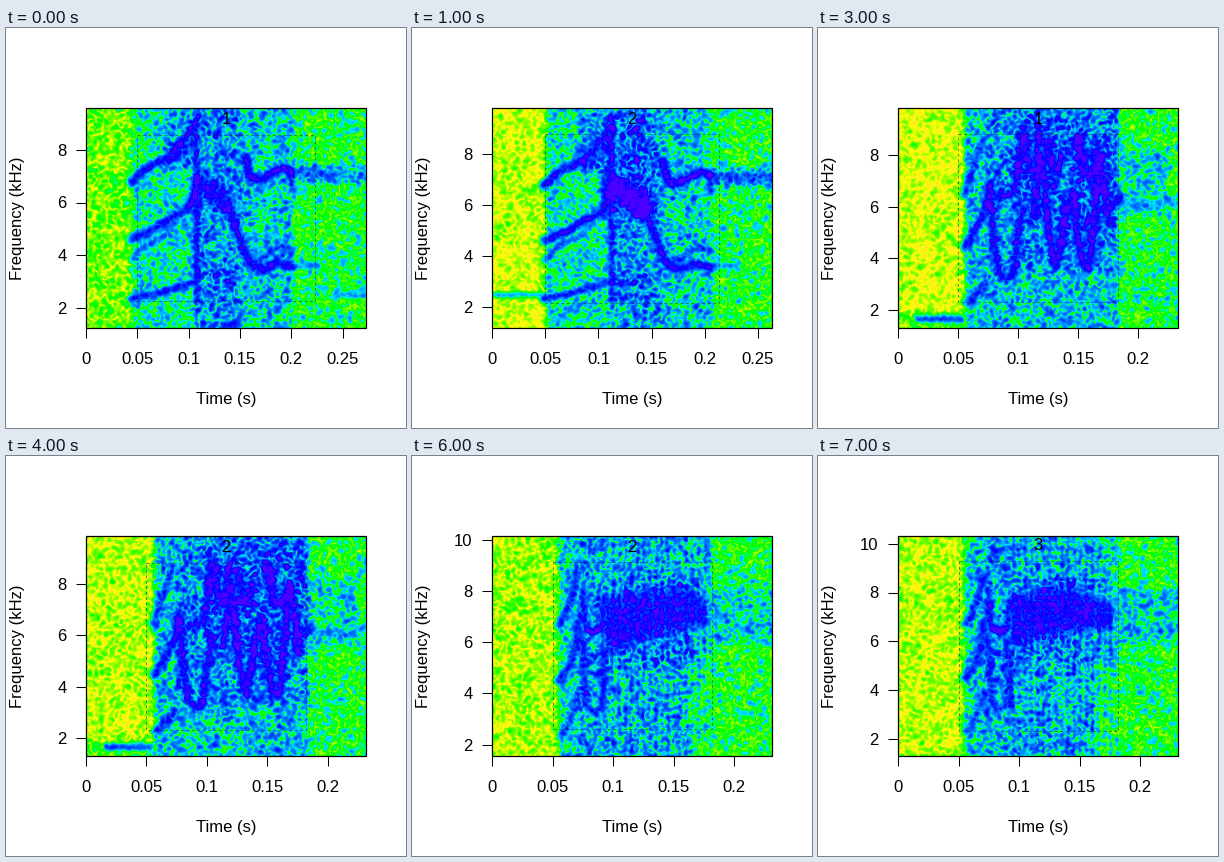
A matplotlib script that plays this animation: 400 px wide and 400 px high, repeating every 8 s.

```python
import colorsys
import numpy as np
import matplotlib.pyplot as plt
from matplotlib.animation import FuncAnimation
from matplotlib.patches import Rectangle

plt.rcParams["font.family"] = "Liberation Sans"
plt.rcParams["font.size"] = 12
LEFT, RIGHT, TOP, BOTTOM = 80, 360, 80, 300
gx, gy = np.meshgrid(np.arange(LEFT, RIGHT) + 0.5, np.arange(TOP, BOTTOM) + 0.5)


def topo_colors():
    """Forty steps from quiet (tan, yellow) to loud (blue, violet)."""
    blue = [(h, 1) for h in np.linspace(43 / 60, 31 / 60, 14)]
    green = [(h, 1) for h in np.linspace(23 / 60, 11 / 60, 13)]
    tan = list(zip(np.linspace(10 / 60, 6 / 60, 13), np.linspace(1, 0.3, 13)))
    return np.array([colorsys.hsv_to_rgb(h, s, 1) for h, s in blue + green + tan])[::-1]


COLORS = topo_colors()

# Ridges: (peak dB, width px, points). Areas: (x0, x1, y0, y1, gain dB).
WHISTLE = dict(
    px=51.3, y8=122, ky=26.25, base=-15.5,
    ridges=[
        (-4, 4.2, [(126, 154), (140, 140), (160, 130), (175, 115), (188, 97)]),
        (-8, 4, [(155, 135), (172, 130), (188, 112)]),
        (-4, 4, [(127, 211), (145, 203), (165, 190), (180, 183), (188, 170), (191, 150)]),
        (-9, 3.5, [(127, 231), (138, 218), (160, 207), (168, 196)]),
        (-5, 3.6, [(126, 271), (150, 266), (175, 258), (188, 254)]),
        (-6, 3.5, [(191, 84), (190, 140), (190, 200), (191, 272)]),
        (-4, 9, [(196, 156), (206, 162), (218, 175)]),
        (-3, 4.2, [(222, 180), (230, 200), (237, 220), (245, 238), (258, 241),
                   (270, 235), (285, 239)]),
        (-7, 3.5, [(248, 235), (258, 230), (266, 222), (276, 218), (284, 221)]),
        (-2, 4.4, [(240, 130), (244, 150), (255, 152), (265, 146), (277, 140), (285, 144)]),
        (-7, 3, [(284, 146), (287, 163)]),
        (-9, 4.5, [(285, 144), (315, 147), (335, 146)]),
        (-11, 3.5, [(284, 238), (312, 237)]),
    ],
    areas=[
        (60, 126, 60, 320, -4.5), (128, 192, 60, 320, 3), (190, 238, 60, 320, 7),
        (238, 288, 60, 320, 4.5), (160, 192, 80, 142, 4), (188, 226, 145, 185, 2),
        (285, 380, 136, 156, 6), (192, 230, 240, 275, 1.5),
    ])

WARBLE = dict(
    px=60.1, y8=127, ky=25.83, base=-15.5,
    ridges=[
        (-7, 4, [(147, 166), (155, 140), (165, 112)]),
        (-4, 4, [(148, 218), (158, 200), (167, 184), (171, 155)]),
        (-6, 4, [(150, 274), (160, 263), (168, 255)]),
        (-4, 4, [(172, 160), (176, 215), (181, 245), (188, 251), (196, 246),
                 (200, 205), (205, 180)]),
        (-3, 4, [(181, 170), (195, 165), (200, 145), (204, 108)]),
        (-4, 4, [(207, 105), (211, 140), (216, 145), (222, 105)]),
        (-2.5, 4, [(216, 185), (223, 130), (227, 155), (231, 205), (238, 238),
                   (243, 215), (248, 182), (255, 163), (259, 205), (264, 234),
                   (271, 240), (275, 205), (281, 130), (286, 155), (291, 195)]),
        (-3, 5, [(229, 115), (236, 144), (244, 130)]),
        (-2, 5, [(261, 110), (266, 146), (273, 147), (282, 130)]),
        (-6, 5, [(290, 180), (302, 170)]),
        (-7, 3, [(100, 291), (143, 291)]),
        (-12, 5, [(302, 175), (340, 178), (355, 172)]),
    ],
    areas=[
        (60, 146, 60, 284, -9), (60, 146, 284, 320, -3), (147, 300, 60, 320, 5),
        (168, 300, 60, 245, 2.5), (196, 300, 90, 200, 2), (300, 350, 122, 188, 3.5),
    ])

TRILL = dict(
    px=60.5, y8=131.5, ky=28.1, base=-16,
    ridges=[
        (-6, 4, [(148, 168), (154, 156), (160, 138), (165, 112)]),
        (-5, 4, [(148, 230), (157, 214), (163, 195), (166, 165)]),
        (-8, 4, [(150, 290), (160, 270), (165, 245)]),
        (-5, 3.6, [(171, 130), (172, 165), (180, 176), (189, 171), (192, 140)]),
        (-1, 3, [(175, 174), (181, 177), (188, 174)]),
        (-6, 3.6, [(170, 180), (172, 225), (174, 258), (181, 265), (190, 261), (192, 200)]),
        (-8, 3, [(173, 198), (181, 204), (190, 198)]),
        (-9, 3, [(172, 80), (181, 88), (191, 80)]),
    ],
    areas=[
        (60, 145, 60, 320, -6.5), (147, 300, 60, 320, 4.5), (165, 280, 60, 320, 2),
        (165, 195, 100, 280, 1), (195, 295, 115, 215, 2), (276, 300, 212, 320, -3),
        (300, 380, 128, 192, 4.5),
    ])

FULL = (60, 320)
# x step per 0.05 s, y of 8 kHz, px per kHz, box (right, top, bottom), label height
SHOTS = [
    dict(kind=WHISTLE, label="1", px=51.3, y8=122, ky=26.25, box=(309, 106.5, 273), ly=90,
         ridges=[(-11, 3, [(330, 267), (360, 267)])]),
    dict(kind=WHISTLE, label="2", px=53.2, y8=126, ky=25.5, box=(307, 105.5, 274.5), ly=89.5, dx=5,
         ridges=[(-12, 3, [(70, 267), (126, 267)]), (-3, 10, [(196, 158), (222, 178)]),
                 (-7, 4, [(184, 150), (183, 185)])],
         areas=[(60, 127, *FULL, -4), (185, 235, 80, 190, 2)]),
    dict(kind=WHISTLE, label="3", px=50.9, y8=125, ky=25.83, box=(309.5, 105.5, 274), ly=90.5, dx=3,
         ridges=[(-11, 3, [(97, 267), (108, 267)]), (-5, 6, [(162, 130), (176, 118)]),
                 (-10, 4, [(285, 240), (350, 238)])]),
    dict(kind=WARBLE, label="1", px=60.1, y8=127, ky=25.83, box=(300, 106, 273.5), ly=90.5),
    dict(kind=WARBLE, label="2", px=60.4, y8=128, ky=25.7, box=(299.5, 106.5, 273.5), ly=90.5, dx=1,
         areas=[(60, 146, *FULL, 1.5)]),
    dict(kind=TRILL, label="1", px=60.5, y8=131.5, ky=28.1, box=(300, 108.5, 271.5), ly=92.5,
         blob=[(198, 172), (225, 164), (255, 153), (276, 149), (293, 154)]),
    dict(kind=TRILL, label="2", px=60.5, y8=135, ky=25.6, box=(300, 106, 273), ly=90,
         blob=[(198, 168), (225, 160), (255, 153), (276, 151), (292, 156)]),
    dict(kind=TRILL, label="3", px=60.5, y8=136.5, ky=24.4, box=(299.5, 104.5, 275), ly=88,
         blob=[(198, 164), (225, 156), (255, 152), (276, 154), (290, 158)],
         areas=[(60, 145, *FULL, -1)]),
]


def speckle(rng, sigma):
    """Decibels of smoothed complex noise with unit power."""
    shape = gx.shape
    z = rng.normal(size=shape) + 1j * rng.normal(size=shape)
    fy, fx = np.fft.fftfreq(shape[0])[:, None], np.fft.fftfreq(shape[1])[None]
    z = np.fft.ifft2(np.fft.fft2(z) * np.exp(-2 * (np.pi * sigma) ** 2 * (fx**2 + fy**2)))
    power = np.abs(z) ** 2
    return 10 * np.log10(power / power.mean() + 0.06)


def soft_box(x, y, x0, x1, y0, y1, soft=2.5):
    def edge(v):
        return 0.5 + 0.5 * np.tanh(v / soft)
    return edge(x - x0) * edge(x1 - x) * edge(y - y0) * edge(y1 - y)


def distance(x, y, points):
    best = np.full(x.shape, 1e9)
    for (ax, ay), (bx, by) in zip(points, points[1:]):
        ux, uy = bx - ax, by - ay
        t = np.clip(((x - ax) * ux + (y - ay) * uy) / (ux * ux + uy * uy), 0, 1)
        best = np.minimum(best, (x - ax - t * ux) ** 2 + (y - ay - t * uy) ** 2)
    return np.sqrt(best)


def spectrogram(i):
    shot = SHOTS[i]
    kind = shot["kind"]
    rng = np.random.default_rng(40 + i)
    noise = speckle(rng, 1.75)
    slow = speckle(rng, 7)
    x = LEFT + (gx - LEFT - shot.get("dx", 0)) * kind["px"] / shot["px"]
    y = kind["y8"] + (gy - shot["y8"]) * kind["ky"] / shot["ky"]

    floor = kind["base"] + 0.15 * slow
    for *box, gain in kind["areas"] + shot.get("areas", []):
        floor = floor + gain * soft_box(x, y, *box)
    if "blob" in shot:
        pulses = np.cos(2 * np.pi * x / 6.1)
        floor += (1.3 * pulses + 0.8 * np.cos(2 * np.pi * y / 9)) * soft_box(x, y, 194, 298, *FULL)
    power = 10 ** ((floor + 0.7 * noise) / 10)

    for peak, width, points in kind["ridges"] + shot.get("ridges", []):
        level = peak - 6 * (distance(x, y, points) / width) ** 2 + 0.22 * noise
        power += 10 ** (level / 10)
    if "blob" in shot:
        cx, cy = zip(*shot["blob"])
        half = np.interp(x, [195, 240, 300], [29, 26, 15])
        d = np.abs(y - np.interp(x, cx, cy)) / half
        inside = 0.5 - 0.5 * np.tanh((np.abs(x - 244) - 50) / 3)
        level = -4 - 4.5 * d**4 + 1.0 * pulses + 0.25 * noise
        power += inside * 10 ** (np.maximum(level, -40) / 10)

    db = np.clip(10 * np.log10(power), -30, -0.5)
    return COLORS[(db + 40).astype(int)]


fig = plt.figure(figsize=(4, 4), dpi=100, facecolor="white")
ax = fig.add_axes([0, 0, 1, 1])


def line(xs, ys):
    ax.plot(xs, ys, color="black", lw=0.75, solid_capstyle="butt")


def draw(i):
    shot = SHOTS[i]
    ax.clear()
    ax.axis("off")
    ax.imshow(spectrogram(i), extent=(LEFT, RIGHT, BOTTOM, TOP), interpolation="bilinear")
    ax.set(xlim=(0, 400), ylim=(400, 0))

    right, top, bottom = shot["box"]
    left = LEFT + shot["px"]
    ax.add_patch(Rectangle((left, top), right - left, bottom - top, fill=False,
                           ec=(0, 0.2, 0.25, 0.55), lw=0.75, ls=(0, (2.6, 2.6))))
    ax.add_patch(Rectangle((LEFT, TOP), RIGHT - LEFT, BOTTOM - TOP, fill=False,
                           ec="black", lw=0.9))
    ax.text(220, shot["ly"] + 6, shot["label"], ha="center", va="baseline")

    for n in range(6):
        x = LEFT + n * shot["px"]
        if x <= RIGHT:
            line([x, x], [BOTTOM, BOTTOM + 10])
            ax.text(x, 336, f"{n * 0.05:g}", ha="center", va="baseline")
    for khz in (2, 4, 6, 8, 10):
        y = shot["y8"] + (8 - khz) * shot["ky"]
        if TOP <= y <= BOTTOM:
            line([LEFT - 10, LEFT], [y, y])
            ax.text(60.5, y + 6, str(khz), ha="right", va="baseline")
    ax.text(220.5, 376, "Time (s)", ha="center", va="baseline")
    ax.text(16, 190, "Frequency (kHz)", rotation=90, rotation_mode="anchor",
            ha="center", va="baseline")
    return []


anim = FuncAnimation(fig, draw, frames=len(SHOTS), init_func=lambda: [],
                     interval=1000, repeat=True, repeat_delay=0)
plt.show()
```
